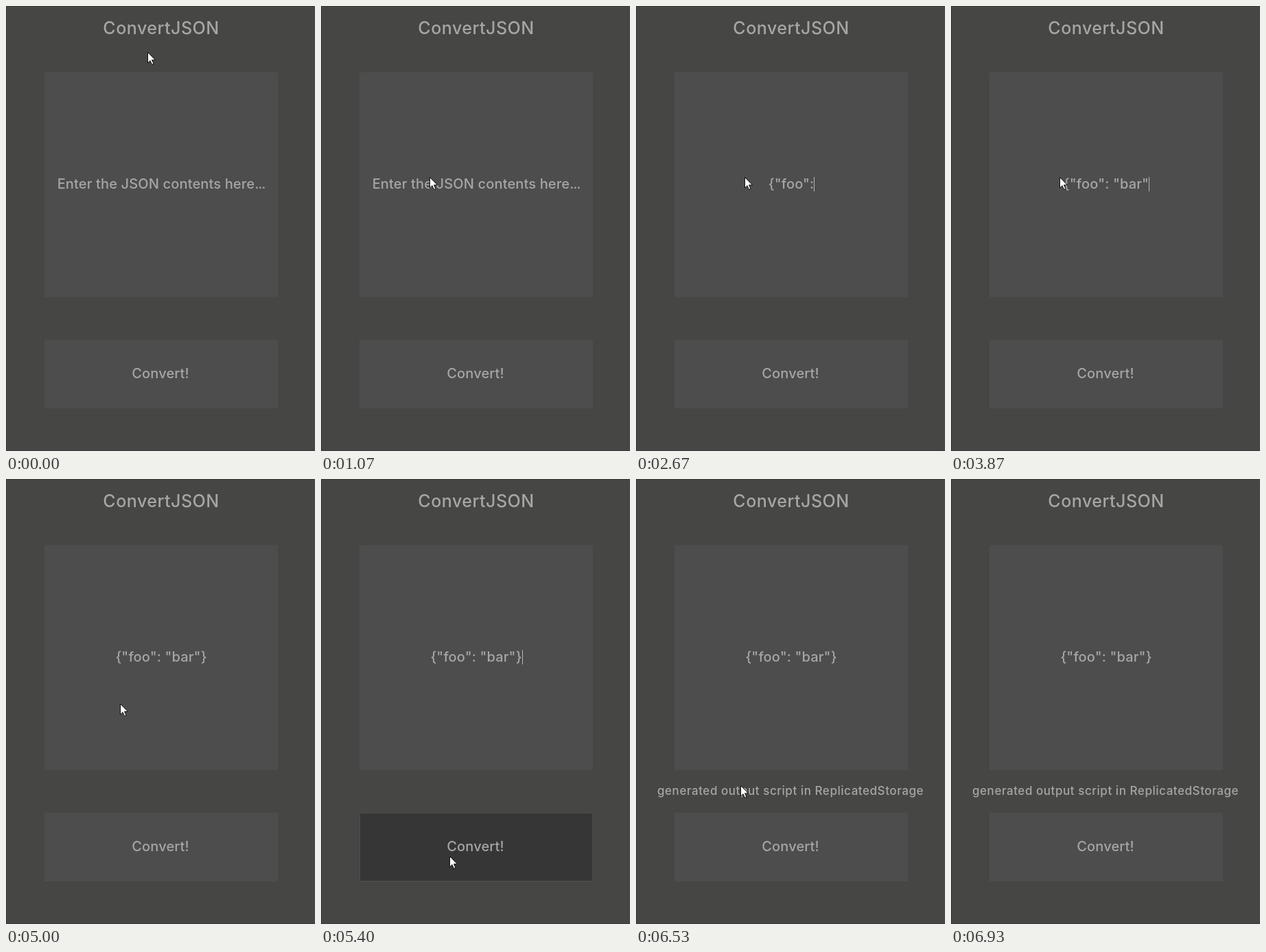
These frames come from a looping animation (450x648 px, 7.27 s). An HTML page:

```html
<!DOCTYPE html>
<html lang="en">
<head>
<meta charset="utf-8">
<title>ConvertJSON</title>
<style>
  html, body { margin: 0; width: 100%; height: 100%; overflow: hidden; background: #464644; }
  svg { display: block; width: 450px; height: 648px; }
  text { font: 500 20px Inter, "Open Sans", sans-serif; fill: #a6a6a6;
         text-anchor: middle; white-space: pre; letter-spacing: .15px; }
  .title { font-size: 25px; letter-spacing: .5px; }
  .status { font-size: 17px; letter-spacing: .55px; }
  .dots { letter-spacing: -1px; }
  .panel { fill: #4d4d4d; }
</style>
</head>
<body>
<svg viewBox="0 0 450 648">
  <rect width="450" height="648" fill="#464644"/>
  <path d="M0 .5H450M.5 0V648" stroke="#3b3b3a"/>
  <path d="M449.5 0V648" stroke="#4e4e4c"/>
  <path d="M0 647.5H450" stroke="#403a40"/>
  <text class="title" x="226" y="41">ConvertJSON</text>
  <rect class="panel" x="56" y="96.5" width="340" height="327.5"/>
  <text id="prompt" x="226" y="266">Enter the JSON contents here<tspan class="dots">...</tspan></text>
  <text id="field" x="226" y="266"></text>
  <rect id="caret" y="249" width="1" height="21" fill="#b4b4b4"/>
  <text class="status" id="status" x="225" y="460">generated output script in ReplicatedStorage</text>
  <rect class="panel" x="56" y="486" width="340" height="100"/>
  <rect id="hover" x="57" y="487" width="338" height="98" fill="#363636"/>
  <text x="225" y="542">Convert!</text>
  <path id="cursor" d="M.5 .5V16L4 12.6 6.6 18.3 9 17.2 6.5 11.7H11.5Z" fill="#fff" stroke="#111"/>
</svg>
<script>
const LOOP = 7270, TICKS_PER_SECOND = 15;
const JSON_TEXT = '{"foo": "bar"}';

// Times are in ticks of 1/15 s.
const FOCUS = 11, BLUR = 82, CONVERTED = 84, BLINK = 5;
const typing = [[15, 0], [19, 1], [27, 3], [30, 5], [44, 8], [58, 13], [67, 14]];
const moves = [
  { from: 7, to: 11, x: 158, y: 249 },
  { from: 72, to: 81, x: 187, y: 549 },
  { from: 83, to: 96, x: 152, y: 427 },
  { from: 96, to: 98, x: 152, y: 446 },
  { from: 98, to: 104, x: 25, y: 650 },
];

const [prompt, field, caret, status, hover, cursor] =
  ['prompt', 'field', 'caret', 'status', 'hover', 'cursor'].map(id => document.getElementById(id));
const show = (el, on) => el.setAttribute('visibility', on ? 'visible' : 'hidden');
const progress = (from, to, t) => Math.min(1, Math.max(0, (t - from) / (to - from)));
const smooth = k => k * k * (3 - 2 * k);

function charsAt(tick) {
  let count = 0;
  for (let i = 1; i < typing.length; i++) {
    const [from, a] = typing[i - 1], [to, b] = typing[i];
    count += (b - a) * progress(from, to, tick);
  }
  return Math.floor(count + .1);
}

// The blink starts over with every key.
function caretOn(tick) {
  if (tick < FOCUS || tick >= BLUR) return false;
  let lastKey = tick;
  while (lastKey > FOCUS && charsAt(lastKey - 1) === charsAt(tick)) lastKey--;
  return Math.floor((tick - lastKey) / BLINK) % 2 === 0;
}

function cursorAt(tick) {
  let x = 206, y = 67;
  for (const move of moves) {
    const k = smooth(progress(move.from, move.to, tick));
    x += (move.x - x) * k;
    y += (move.y - y) * k;
  }
  return [Math.round(x), Math.round(y)];
}

function render(tick) {
  const chars = charsAt(tick);
  field.textContent = JSON_TEXT.slice(0, chars);
  show(prompt, chars === 0);

  const edge = chars ? field.getComputedTextLength() / 2 : -prompt.getComputedTextLength() / 2;
  caret.setAttribute('x', Math.round(226 + edge));
  show(caret, caretOn(tick));

  const [x, y] = cursorAt(tick);
  cursor.setAttribute('transform', `translate(${x} ${y})`);
  show(hover, x >= 56 && x < 396 && y >= 486 && y < 586);
  show(status, tick >= CONVERTED);
}

const start = performance.now();
let lastTick = -1;
function frame() {
  const time = (performance.now() - start) % LOOP;
  const tick = Math.floor((time + 4) * TICKS_PER_SECOND / 1000);
  if (tick !== lastTick) render(lastTick = tick);
  requestAnimationFrame(frame);
}
frame();
</script>
</body>
</html>
```
